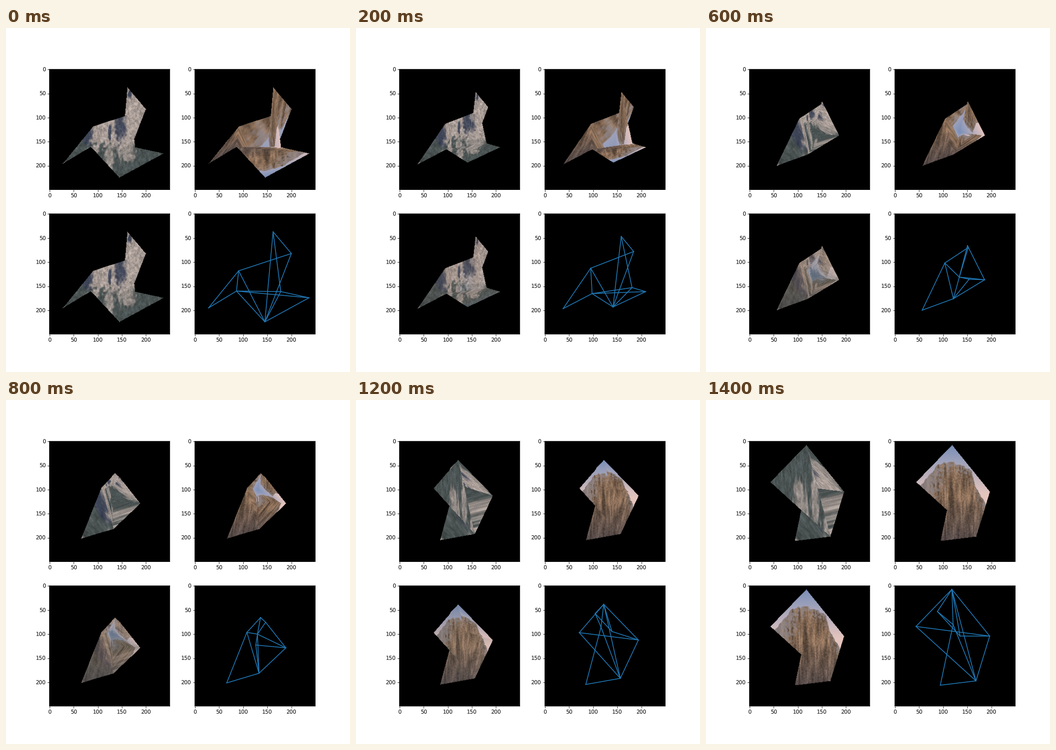
Animation, 748 px wide and 748 px high, one loop 1600 ms. Source, as a matplotlib script:

```python
import matplotlib.pyplot as plt
import numpy as np
from matplotlib.animation import FuncAnimation
from matplotlib.collections import LineCollection

SIZE = 250
STEPS = 8
# Corners A to H of the mesh at both ends of the motion.
START = np.array([(162, 37), (200, 82), (90.5, 118), (86, 160),
                  (28, 195), (145, 224), (178, 161), (236.5, 174)])
END = np.array([(135, 104), (88, 53), (120.5, 80), (168, 197),
                (94, 206), (118, 7), (196.5, 104), (43.5, 84)])
# Later triangles cover earlier ones where the mesh folds over itself.
TRIANGLES = [["ABCDEFGH".index(c) for c in name]
             for name in "FGH BCF ABF AFG CDE CDF DGH DFH".split()]
EDGES = np.array(sorted({tuple(sorted((t[i], t[i - 1])))
                         for t in TRIANGLES for i in range(3)}))

rng = np.random.default_rng(7)
Y, X = np.mgrid[:SIZE, :SIZE].astype(float)


def ramp(n):
    pos = np.linspace(0, n - 1, SIZE)
    return np.maximum(0, 1 - abs(pos[:, None] - np.arange(n)))


def noise(nx, ny):
    """Smooth random field in -0.5..0.5 with nx by ny cells."""
    return ramp(ny) @ (rng.random((ny, nx)) - 0.5) @ ramp(nx).T


def soft(distance, width):
    return np.clip(0.5 + distance / width, 0, 1)


def blob(cx, cy, rx, ry):
    """Soft ellipse with a ragged border."""
    radius = np.hypot((X - cx) / rx, (Y - cy) / ry)
    return soft(1 - radius + 0.9 * noise(70, 45), 0.6)


def mix(img, color, weight):
    return img + weight[..., None] * (np.array(color) - img)


def shade(img, amount):
    return np.clip(img * (1 + amount[..., None]), 0, 255)


def make_valley():
    rock, shadow = (168, 156, 150), (58, 65, 84)
    img = np.full((SIZE, SIZE, 3), (76, 84, 84), float)
    treeline = soft(158 - Y + 28 * noise(60, 40), 10)
    left_edge = soft(X - 90 + 0.27 * (Y - 112), 5)
    img = mix(img, rock, treeline * left_edge)
    for spot in ((124, 182, 9, 25), (160, 170, 18, 20), (96, 166, 9, 8), (28, 195, 7, 5)):
        img = mix(img, rock, 0.8 * blob(*spot))
    for spot in ((147, 122, 11, 25), (77, 135, 12, 19), (125, 128, 3, 16), (167, 52, 4, 9)):
        img = mix(img, shadow, 0.9 * blob(*spot))
    return shade(img, 0.3 * noise(200, 200) + 0.35 * noise(80, 50))


def make_peak():
    warmth = np.clip((Y - 7) / 100, 0, 1)
    sky = mix(np.full((SIZE, SIZE, 3), (122, 143, 184.0)), (228, 197, 190), warmth)
    rock = np.full((SIZE, SIZE, 3), (128, 102, 82), float)
    rock = mix(rock, (84, 73, 71), soft(Y - 160, 90))
    streaks = 0.6 * noise(90, 12) + 0.35 * noise(40, 5) + 0.35 * noise(170, 130)
    rock = shade(rock, streaks)
    # Snow covers the left shoulder and dusts the crown.
    ridge = np.interp(X, (50, 90, 118, 158, 166, 190), (95, 46, 43, 58, 92, 135))
    shoulder = 82 - X + 0.35 * (105 - Y)
    crown = 8 - (Y - ridge)
    snow = soft(np.maximum(shoulder, crown) + 50 * noise(110, 80), 25)
    rock = mix(rock, (146, 138, 142), 0.75 * snow)
    return mix(sky, rock, soft(Y - ridge + 6 * noise(60, 60), 2))


def warp(img, source, target):
    """Move each triangle of the image from source to target corners."""
    out = np.zeros_like(img)
    grid = np.stack([X, Y, np.ones_like(X)], -1)
    for tri in TRIANGLES:
        corners = np.vstack([target[tri].T, np.ones(3)])
        if abs(np.linalg.det(corners)) < 1e-6:
            continue
        weights = grid @ np.linalg.inv(corners).T
        inside = (weights >= 0).all(-1)
        x, y = np.rint(weights[inside] @ source[tri]).astype(int).T
        out[inside] = img[y, x]
    return out


plt.rcParams.update({"path.snap": False, "text.hinting": "none"})
valley, peak = make_valley(), make_peak()
fig, axes = plt.subplots(2, 2, figsize=(9, 9), dpi=748 / 9)
black = np.zeros((SIZE, SIZE, 3), np.uint8)
panels = [ax.imshow(black) for ax in axes.flat]
mesh = LineCollection([], colors="C0", linewidths=1.5, capstyle="projecting")
axes[1, 1].add_collection(mesh, autolim=False)


def update(frame):
    t = frame / (STEPS - 1)
    points = (1 - t) * START + t * END
    first = warp(valley, START, points)
    second = warp(peak, END, points)
    for panel, img in zip(panels, (first, second, (1 - t) * first + t * second)):
        panel.set_data(img.astype(np.uint8))
    mesh.set_segments(points[EDGES])
    return [*panels, mesh]


anim = FuncAnimation(fig, update, frames=STEPS, interval=200, repeat=True,
                     repeat_delay=0, blit=False)
plt.show()
```
